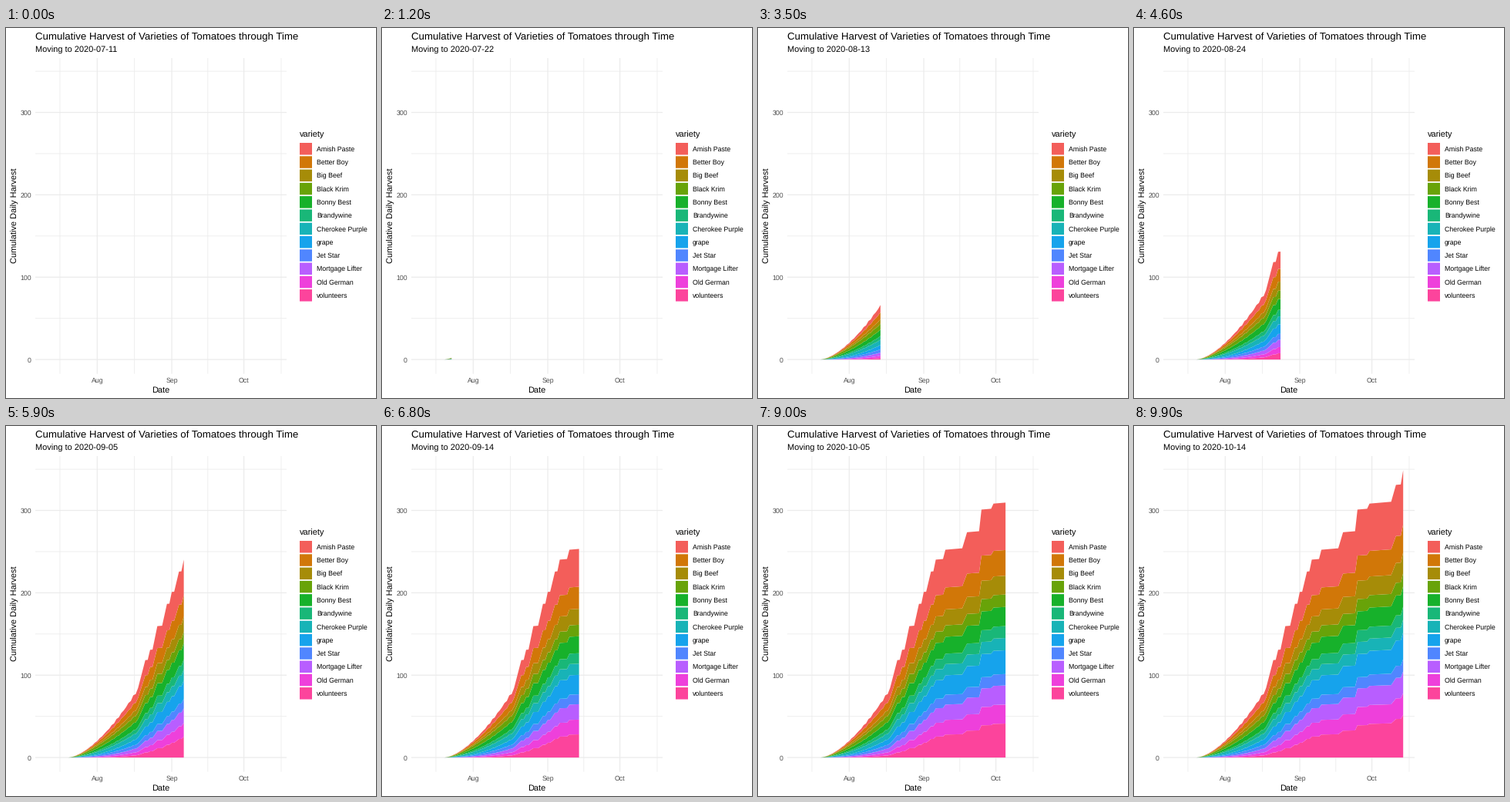
A matplotlib script that plays this animation: 480 by 480 pixels, repeating every 10 s.

```python
import numpy as np
import matplotlib.pyplot as plt
from matplotlib.animation import FuncAnimation
from matplotlib.patches import Polygon, Rectangle

SIZE, DPI, FRAMES = 480, 80, 100
PT = 72 / DPI  # points per pixel
FIRST_DAY, LAST_DAY = 9, 95
START = np.datetime64("2020-07-11")
LEFT, RIGHT, TOP, BOTTOM = 38, 364, 39, 448.6

plt.rcParams["font.family"] = "Liberation Sans"
plt.rcParams["text.hinting"] = "none"

# name, colour, final harvest, lateness (above 1 ripens late)
VARIETIES = [
    ("Amish Paste", "#f35e5a", 65.7, 1.17),
    ("Better Boy", "#d17708", 34.0, 0.80),
    ("Big Beef", "#a68c08", 25.0, 0.85),
    ("Black Krim", "#68a309", 15.8, 0.45),
    ("Bonny Best", "#17b12b", 24.9, 0.65),
    ("Brandywine", "#19b778", 15.6, 0.70),
    ("Cherokee Purple", "#18b3b7", 15.7, 0.50),
    ("grape", "#16a3ec", 32.4, 1.04),
    ("Jet Star", "#5086ff", 15.0, 0.75),
    ("Mortgage Lifter", "#b85eff", 26.3, 1.12),
    ("Old German", "#ee40db", 26.7, 1.30),
    ("volunteers", "#fc449c", 51.6, 1.95),
]

# Big pickings: start day, length in days, gain
RAMP_END = 38
SURGES = [(38, 3, 33), (42, 1, 12), (44, 2, 28), (48, 2, 26), (51, 1, 14),
          (53, 2, 24), (56, 1, 14), (60, 1, 11), (68, 2, 19), (75, 1, 26),
          (80, 1, 6), (90, 2, 20), (94, 1, 17)]


def x_of(day):
    return 52.8 + 3.12 * day


def y_of(value):
    return 430.1 - 1.0685 * value


def harvest(days):
    """Total by day: a rippled ramp, then a slow drift with surges."""
    early = np.minimum(days, RAMP_END)
    ramp = 0.38 * (early - FIRST_DAY) ** 1.6
    total = ramp * (1 + 0.02 * np.sin(2.756 * (early - 28.5)))
    total += 0.25 * (days - early)
    for start, length, gain in SURGES:
        total += gain * np.clip((days - start) / length, 0, 1)
    return total


def stack_edges(total):
    """Pixel heights of the layer edges, from the baseline up."""
    done = total / total[-1]
    parts = np.array([final * done ** late
                      for _, _, final, late in VARIETIES[::-1]])
    parts *= total / np.maximum(parts.sum(axis=0), 1e-9)
    return y_of(np.vstack([np.zeros_like(total), np.cumsum(parts, axis=0)]))


fig = plt.figure(figsize=(SIZE / DPI, SIZE / DPI), dpi=DPI, facecolor="white")
ax = fig.add_axes([0, 0, 1, 1])
ax.set(xlim=(0, SIZE), ylim=(SIZE, 0))
ax.axis("off")


def label(x, y, text, size=8.8, color="black", **kw):
    return ax.text(x, y, text, fontsize=size * PT, color=color,
                   **{"va": "baseline", **kw})


def grid(days, values, width):
    style = dict(color="#ebebeb", lw=width * PT, solid_capstyle="butt",
                 snap=False, zorder=1)
    for x in map(x_of, days):
        ax.plot([x, x], [TOP, BOTTOM], **style)
    for y in map(y_of, values):
        ax.plot([LEFT, RIGHT], [y, y], **style)


months = {"Aug": 21, "Sep": 52, "Oct": 82}
grid((5.5, 36.5, 67, 97.5), range(50, 400, 100), 0.8)
grid(months.values(), range(0, 400, 100), 1.2)

for name, day in months.items():
    label(x_of(day), 460.3, name, color="#4d4d4d", ha="center")
for value in range(0, 400, 100):
    label(33, y_of(value) + 3.5, str(value), color="#4d4d4d", ha="right")

label(38, 15, "Cumulative Harvest of Varieties of Tomatoes through Time", 13.23)
subtitle = label(38, 32, "", 11)
label(201, 473, "Date", 11, ha="center")
label(11.6, 243.5, "Cumulative Daily Harvest", 11, rotation=90,
      ha="center", va="center")

label(380.5, 141.5, "variety", 11)
for i, (name, color, *_) in enumerate(VARIETIES):
    y = 149 + 17.28 * i
    ax.add_patch(Rectangle((381, y), 16, 15.5, fc=color, lw=0, snap=False))
    label(403, y + 11, name)

days = np.arange(FIRST_DAY, LAST_DAY + 1)
edges = stack_edges(harvest(days))
xs = x_of(days)
layers = [ax.add_patch(Polygon([(0, 0)], fc=v[1], lw=0, zorder=3, snap=False))
          for v in VARIETIES[::-1]]


def update(i):
    day = LAST_DAY * i / (FRAMES - 1)
    subtitle.set_text(f"Moving to {START + int(day + 1e-9)}")
    n = int(np.rint(day)) - FIRST_DAY + 1
    for layer, low, high in zip(layers, edges, edges[1:]):
        layer.set_visible(n > 1)
        if n > 1:
            layer.set_xy(np.column_stack([
                np.r_[xs[:n], xs[:n][::-1]],
                np.r_[low[:n], high[:n][::-1]]]))
    return [subtitle, *layers]


anim = FuncAnimation(fig, update, frames=FRAMES, interval=100,
                     repeat=True, repeat_delay=0)
plt.show()
```
